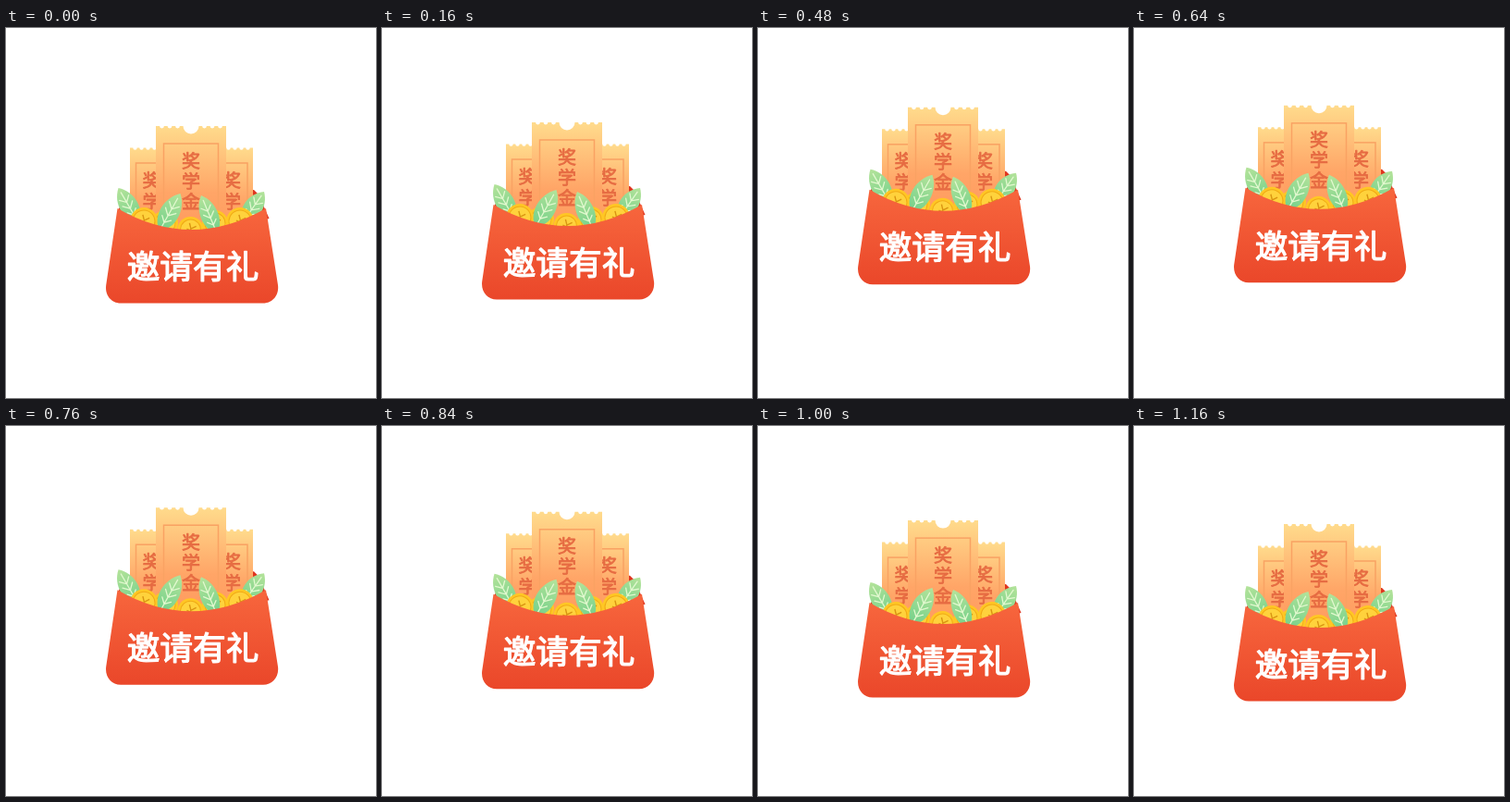
Write an HTML page that moves like this. It is 400 by 400 pixels and loops after 1.2 s.

```html
<!DOCTYPE html>
<html lang="zh-CN">
<head>
<meta charset="utf-8">
<title>邀请有礼</title>
<style>
html, body { margin: 0; width: 100%; height: 100%; overflow: hidden; background: #fff; }
svg { display: block; width: 100vw; height: 100vh; }
text {
  font-family: "Noto Sans CJK SC", "Noto Sans CJK", sans-serif;
  font-weight: 400;
  text-anchor: middle;
  text-rendering: geometricPrecision;
  stroke-linejoin: round;
}
</style>
</head>
<body>
<svg viewBox="0 0 400 400">
  <defs>
    <linearGradient id="paper" x1="0" y1="0" x2="0" y2="1">
      <stop offset="0" stop-color="#ffdb8c"/>
      <stop offset=".62" stop-color="#ffa567"/>
      <stop offset="1" stop-color="#ff9a5e"/>
    </linearGradient>
    <linearGradient id="bag" x1="0" y1="0" x2="0" y2="1">
      <stop offset="0" stop-color="#f7663d"/>
      <stop offset="1" stop-color="#ea472a"/>
    </linearGradient>
    <linearGradient id="green" x1="0" y1="0" x2="1" y2="0">
      <stop offset="0" stop-color="#72d08a"/>
      <stop offset="1" stop-color="#b4e39a"/>
    </linearGradient>
  </defs>
  <g id="gift"></g>
</svg>
<script>
const LOOP = 1200, PEAK = 600, LANDED = 1145, LIFT = 22.5;
const gift = document.getElementById('gift');

// Ticket with a row of round bites along the top edge
function ticket({ x, y, w, bites, frame, cx, rows, label }) {
  let d = `M${x} ${y}`;
  for (const [bx, br] of bites) d += `H${bx - br}A${br} ${br} 0 0 0 ${bx + br} ${y}`;
  d += `H${x + w}V222H${x}Z`;
  const chars = [...label].map((c, i) =>
    `<text x="${cx}" y="${rows[i] + 7.6}" font-size="20">${c}</text>`).join('');
  return `<path d="${d}" fill="url(#paper)"/>
    <rect x="${frame[0]}" y="${frame[1]}" width="${frame[2]}" height="110" fill="none" stroke="#f9a263" stroke-width="1.5"/>
    <g fill="#e66b42" stroke="#e66b42" stroke-width=".8">${chars}</g>`;
}

function coin(x, y, r) {
  return `<g transform="translate(${x} ${y}) rotate(25)">
    <circle r="${r}" fill="#ffc724"/>
    <circle r="${r - 3}" fill="#ffd23c" stroke="#f0aa16" stroke-width="1"/>
    <path d="M-4 -6L0 -1L4 -6M0 -1V7M-4 1H4" fill="none" stroke="#d99412" stroke-width="1.4"/>
  </g>`;
}

// Leaf drawn along its own axis, from base (0) to tip (len)
function leaf(bx, by, tx, ty, w) {
  const len = Math.hypot(tx - bx, ty - by);
  const angle = Math.atan2(ty - by, tx - bx) * 180 / Math.PI;
  const h = w * 0.67;
  let veins = `M0 0H${len * 0.87}`;
  for (const k of [0.22, 0.4, 0.58]) {
    const x = len * k, s = w * (0.32 - Math.abs(k - 0.45) * 0.25);
    veins += `M${x + s} ${-s}L${x} 0L${x + s} ${s}`;
  }
  return `<g transform="translate(${bx} ${by}) rotate(${angle})">
    <path d="M0 0C${len * 0.2} ${-h} ${len * 0.72} ${-h} ${len} 0C${len * 0.72} ${h} ${len * 0.2} ${h} 0 0Z" fill="url(#green)"/>
    <path d="${veins}" fill="none" stroke="#e2f8cf" stroke-width="1.3" stroke-linecap="round"/>
  </g>`;
}

const row = (from, step, n, r) => Array.from({ length: n }, (_, i) => [from + i * step, r]);

gift.innerHTML = [
  '<path d="M121 197L131 180L268 175L273 180L284.5 206L200 225Z" fill="#df351f"/>',
  ticket({ x: 134, y: 129.5, w: 44, bites: row(139.5, 7, 4, 2.2), frame: [140.5, 146, 32],
    cx: 157.5, rows: [164, 187], label: '奖学' }),
  ticket({ x: 223, y: 129.5, w: 44, bites: row(240.5, 7, 4, 2.2), frame: [229, 146, 32],
    cx: 244, rows: [164, 187], label: '奖学' }),
  ticket({ x: 162, y: 106, w: 76, bites: [...row(168.5, 8.5, 3, 2.4), [200, 8.5], ...row(214.5, 8.5, 3, 2.4)],
    frame: [170.5, 125, 59], cx: 200, rows: [143, 165, 187], label: '奖学金' }),
  leaf(143, 210, 121.5, 173, 20),
  leaf(256, 210, 279, 177, 20),
  coin(172, 211, 14), coin(226, 211, 14),
  coin(149, 209, 15), coin(253, 209, 15), coin(199.5, 218, 14),
  leaf(166, 219, 188.5, 179, 21),
  leaf(228, 222, 211, 181, 19),
  `<path d="M120.5 195Q200 241 281 195L294 278C295.4 289 288 297.5 278 297.5H124C114 297.5 106.8 289 108.2 278Z" fill="url(#bag)"/>`,
  '<text x="202" y="270.7" font-size="35.7" fill="#fff" stroke="#fff" stroke-width="1.3">邀请有礼</text>'
].join('');

const smooth = u => u * u * (3 - 2 * u);

function lift(t) {
  if (t < PEAK) return LIFT * smooth(t / PEAK);
  return LIFT * (1 - smooth(Math.min(1, (t - PEAK) / (LANDED - PEAK))));
}

function draw(now) {
  gift.setAttribute('transform', `translate(0 ${-lift(now % LOOP)})`);
  requestAnimationFrame(draw);
}
draw(performance.now());
</script>
</body>
</html>
```
